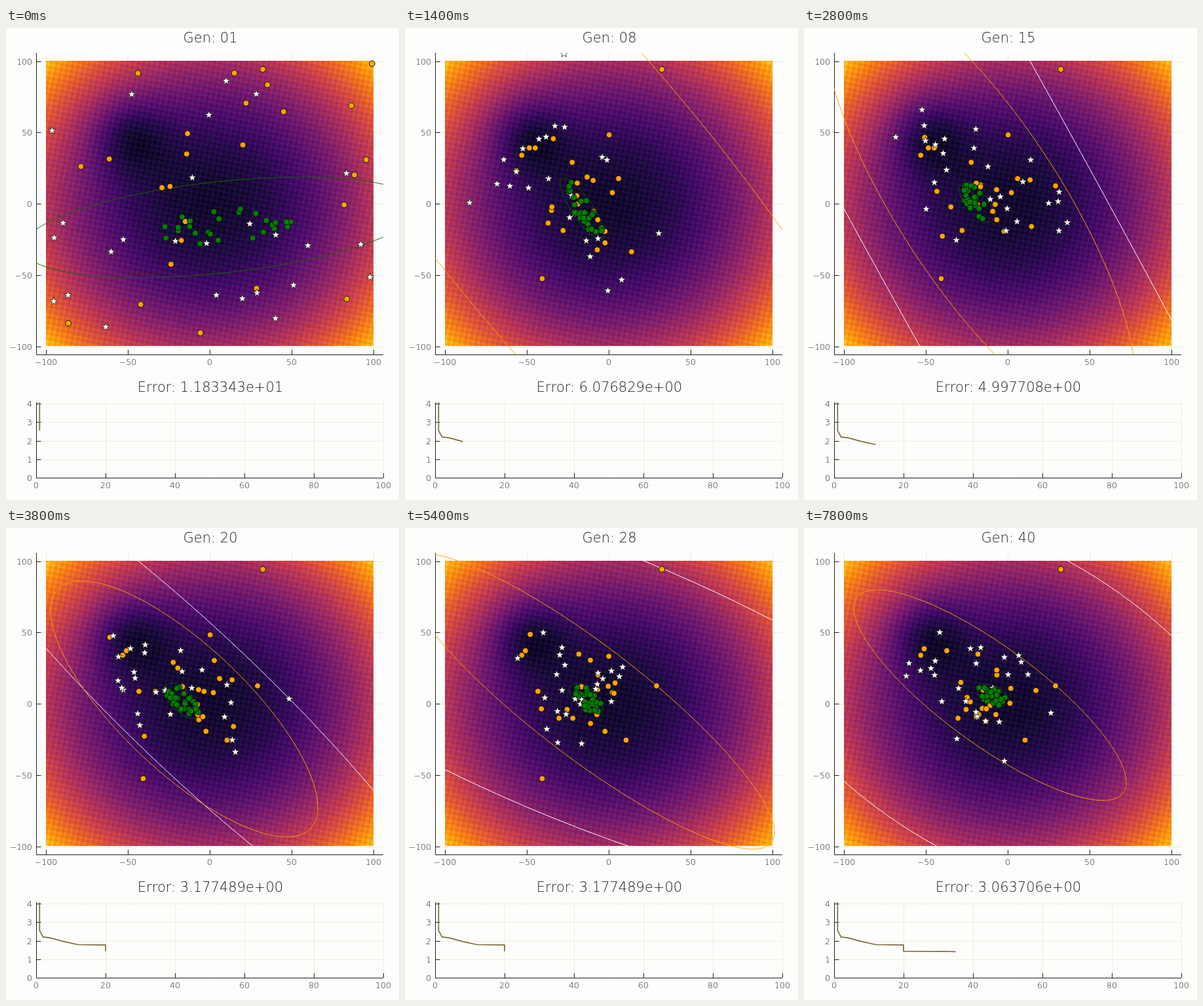
Recreate the animation shown at these times as an HTML page with a canvas. Size 600 by 720 pixels, loop 8 s.

```html
<!DOCTYPE html>
<html lang="en">
<head>
<meta charset="utf-8">
<title>Optimizer comparison</title>
<style>
  html, body { margin: 0; width: 100%; height: 100%; overflow: hidden; background: #fdfdfc; }
  canvas { display: block; }
</style>
</head>
<body>
<canvas id="stage" width="600" height="720"></canvas>
<script>
const ctx = document.getElementById('stage').getContext('2d');
const STEP = 200, GENERATIONS = 40, MEMBERS = 26;
const FONT = '"DejaVu Sans", sans-serif';
const GREEN = '#008000', ORANGE = '#ffa500', WHITE = '#ffffff', PAPER = '#fdfdfc', INK = '#20201c';
const MAP = { x: 61, y: 50, w: 500, h: 435 };
const BASIN = [195, 178];

// Search ellipses by generation: centre x, centre y, half width, shear, half height at the centre.
const searches = {
  green: { 1: [328,304,303,-31,70], 8: [271,276,34,39,26], 15: [264,266,27,20,22], 40: [288,255,24,7,15] },
  orange: { 1: [265,268,1500,900,1200], 8: [265,268,566,579,333], 15: [268,268,237,264,205],
    20: [272,276,204,150,125], 28: [278,264,286,200,105], 34: [276,252,257,175,77], 40: [284,255,208,133,90] },
  white: { 1: [265,268,4000,4000,3000], 15: [261,268,1031,1816,367], 20: [292,270,414,368,143],
    28: [290,244,670,249,223], 34: [316,267,346,252,176], 40: [303,268,400,152,264] }
};

// Best error so far: generation, value.
const bests = [[1,60], [1,11.83343], [2,8.024617], [4,7.671905], [8,6.076829], [12,4.997708], [20,4.871206],
  [20,3.177489], [32,3.16371], [35,3.063706]];

const mix = (a, b, f) => a + (b - a) * f;

function random(seed) {
  let s = seed * 2654435761 >>> 0;
  return () => {
    s = s + 0x6D2B79F5 >>> 0;
    let t = Math.imul(s ^ s >>> 15, 1 | s);
    t = t + Math.imul(t ^ t >>> 7, 61 | t) ^ t;
    return ((t ^ t >>> 14) >>> 0) / 4294967296;
  };
}

function ellipseAt(keys, gen) {
  const gens = Object.keys(keys).map(Number);
  const next = Math.max(1, gens.findIndex(g => g >= gen));
  const from = gens[next - 1], to = gens[next];
  return keys[from].map((v, n) => mix(v, keys[to][n], (gen - from) / (to - from)));
}

const onEllipse = ([cx, cy, w, shear, h], angle, r = 1) => [
  cx + r * w * Math.cos(angle),
  cy + r * (shear * Math.cos(angle) + h * Math.sin(angle))
];

const anywhere = rnd => [MAP.x + rnd() * MAP.w, MAP.y + rnd() * MAP.h];

function around([x, y], spread, rnd) {
  const r = spread * Math.sqrt(-2 * Math.log(1 - rnd())), angle = rnd() * 2 * Math.PI;
  return [x + r * Math.cos(angle), y + 0.85 * r * Math.sin(angle)];
}

const population = make => Array.from({ length: MEMBERS }, (_, i) => make(i));

// A member stays where it is until it finds a better place; a few settle in the side basin.
function orangeAt(gen) {
  return population(i => {
    const rnd = random(i + 31);
    let spot = anywhere(rnd);
    for (let g = 2; g <= gen; g++) {
      const jumps = rnd() < (g < 8 ? 0.4 : 0.08);
      const better = i < 3 ? around(BASIN, 16, rnd)
        : around([mix(268, 292, g / 40), 270 - g / 4], 24 + 38 * Math.exp(-g / 18), rnd);
      if (jumps) spot = better;
    }
    return spot;
  });
}

// Trial points are drawn afresh in every generation.
function starsAt(gen) {
  const rnd = random(gen + 400);
  return population(i => gen === 1 ? anywhere(rnd)
    : around(i < 4 ? BASIN : [270, 254], i < 4 ? 24 : 52 + 60 * Math.exp(-gen / 6), rnd));
}

function greenAt(gen) {
  const rnd = random(gen + 70), cloud = ellipseAt(searches.green, gen);
  const fill = Math.min(0.95, 0.28 + gen * 0.09);
  return population(() => onEllipse(cloud, rnd() * 2 * Math.PI, fill * Math.sqrt(rnd())));
}

function makeHeatmap({ w, h }) {
  const stops = ['000004', '160b39', '420a68', '6a176e', '932667', 'bc3754', 'dd513a', 'f37819', 'fca50a', 'f6d746', 'fcffa4']
    .map(c => [0, 2, 4].map(n => parseInt(c.slice(n, n + 2), 16)));
  const map = document.createElement('canvas');
  map.width = w; map.height = h;
  const g = map.getContext('2d'), img = g.createImageData(w, h);
  const wave = 2 * Math.PI / 8.3;
  for (let y = 0; y < h; y++) for (let x = 0; x < w; x++) {
    const dx = (x - w / 2) / (w / 2), dy = (y - h / 2) / (h / 2);
    const basin = 0.17 * Math.exp(-((x - 127) ** 2 + (y - 115) ** 2) / 3400);
    const ripple = 0.024 * (Math.cos(wave * (x + 0.2 * y)) + Math.cos(wave * (y - 0.2 * x)));
    const v = Math.min(0.999, Math.max(0, 0.08 + 0.41 * (dx * dx + 0.88 * dy * dy) - basin - ripple)) * 10;
    const i = Math.floor(v), at = (y * w + x) * 4;
    for (let c = 0; c < 3; c++) img.data[at + c] = mix(stops[i][c], stops[i + 1][c], v - i);
    img.data[at + 3] = 255;
  }
  g.putImageData(img, 0, 0);
  return map;
}

function line(points, color, width = 1, dash = []) {
  ctx.beginPath();
  points.forEach(([x, y]) => ctx.lineTo(x, y));
  ctx.strokeStyle = color;
  ctx.lineWidth = width;
  ctx.setLineDash(dash);
  ctx.stroke();
  ctx.setLineDash([]);
}

function text(str, x, y, font, align = 'center') {
  ctx.font = `${font} ${FONT}`;
  ctx.textAlign = align;
  ctx.fillStyle = INK;
  ctx.fillText(str, x, y);
}

function axes(top, bottom, xs, ys) {
  const left = 46.5, right = 576, grid = '#dedec4';
  xs.forEach(([x]) => line([[x + 0.5, top], [x + 0.5, bottom]], grid, 1, [1, 1]));
  ys.forEach(([y]) => line([[left, y + 0.5], [right, y + 0.5]], grid, 1, [1, 1]));
  line([[left, top], [left, bottom + 0.5], [right, bottom + 0.5]], INK);
  xs.forEach(([x, label]) => {
    line([[x + 0.5, bottom], [x + 0.5, bottom - 7]], INK);
    text(label, x, bottom + 16, '200 12.5px');
  });
  ys.forEach(([y, label]) => {
    line([[left, y + 0.5], [left + 7, y + 0.5]], INK);
    text(label, 40, y + 5, '200 12.5px', 'right');
  });
}

function marker([x, y], fill, star) {
  ctx.beginPath();
  if (star) {
    for (let i = 0; i < 10; i++) {
      const r = i % 2 ? 2.6 : 6.2, a = i * Math.PI / 5 - Math.PI / 2;
      ctx.lineTo(x + r * Math.cos(a), y + r * Math.sin(a));
    }
    ctx.closePath();
  } else ctx.arc(x, y, 4.4, 0, 2 * Math.PI);
  ctx.fillStyle = fill;
  ctx.fill();
  ctx.strokeStyle = '#101008';
  ctx.lineWidth = star ? 0.7 : 1;
  ctx.stroke();
}

function clipped(x, y, w, h, paint) {
  ctx.save();
  ctx.beginPath();
  ctx.rect(x, y, w, h);
  ctx.clip();
  paint();
  ctx.restore();
}

const ticks = (from, step, count, toPixel) => Array.from({ length: count }, (_, i) => {
  const v = from + i * step;
  return [Math.round(toPixel(v)), String(v).replace('-', '\u2212')];
});
const heatmap = makeHeatmap(MAP);
const mapX = ticks(-100, 50, 5, v => 311 + 2.5 * v);
const mapY = ticks(-100, 50, 5, v => 268 - 2.175 * v);
const plotX = v => 46 + 5.3 * v, plotY = v => 686 - 28.2 * v;
const errorX = ticks(0, 20, 6, plotX);
const errorY = ticks(0, 1, 5, plotY);

function drawSearch(keys, gen, color) {
  const e = ellipseAt(keys, gen);
  line(Array.from({ length: 721 }, (_, i) => onEllipse(e, i * Math.PI / 360)), color);
}

function draw(gen) {
  ctx.fillStyle = PAPER;
  ctx.fillRect(0, 0, 600, 720);
  axes(38, 498, mapX, mapY);
  axes(571, 686, errorX, errorY);
  ctx.drawImage(heatmap, MAP.x, MAP.y);

  clipped(MAP.x, MAP.y, MAP.w, MAP.h, () => drawSearch(searches.white, gen, WHITE));
  clipped(46, 38, 530, 460, () => {
    drawSearch(searches.orange, gen, ORANGE);
    drawSearch(searches.green, gen, '#1c6400');
    orangeAt(gen).forEach(p => marker(p, ORANGE));
    starsAt(gen).forEach(p => marker(p, WHITE, true));
    greenAt(gen).forEach(p => marker(p, GREEN));
  });

  const reached = bests.filter(b => b[0] <= gen);
  clipped(46, 571, 530, 116, () =>
    line(reached.map(([g, v]) => [plotX(g), plotY(Math.log1p(v))]), '#7d6b40', 1.7));

  const error = reached[reached.length - 1][1].toExponential(6).replace(/\+(\d)$/, '+0$1');
  text('Gen: ' + String(gen).padStart(2, '0'), 312, 22, '200 21px');
  text('Error: ' + error, 312, 555, '200 21px');
}

let shown = 0;
function tick() {
  const gen = Math.floor(performance.now() / STEP) % GENERATIONS + 1;
  if (gen !== shown) draw(shown = gen);
  requestAnimationFrame(tick);
}
tick();
</script>
</body>
</html>
```
